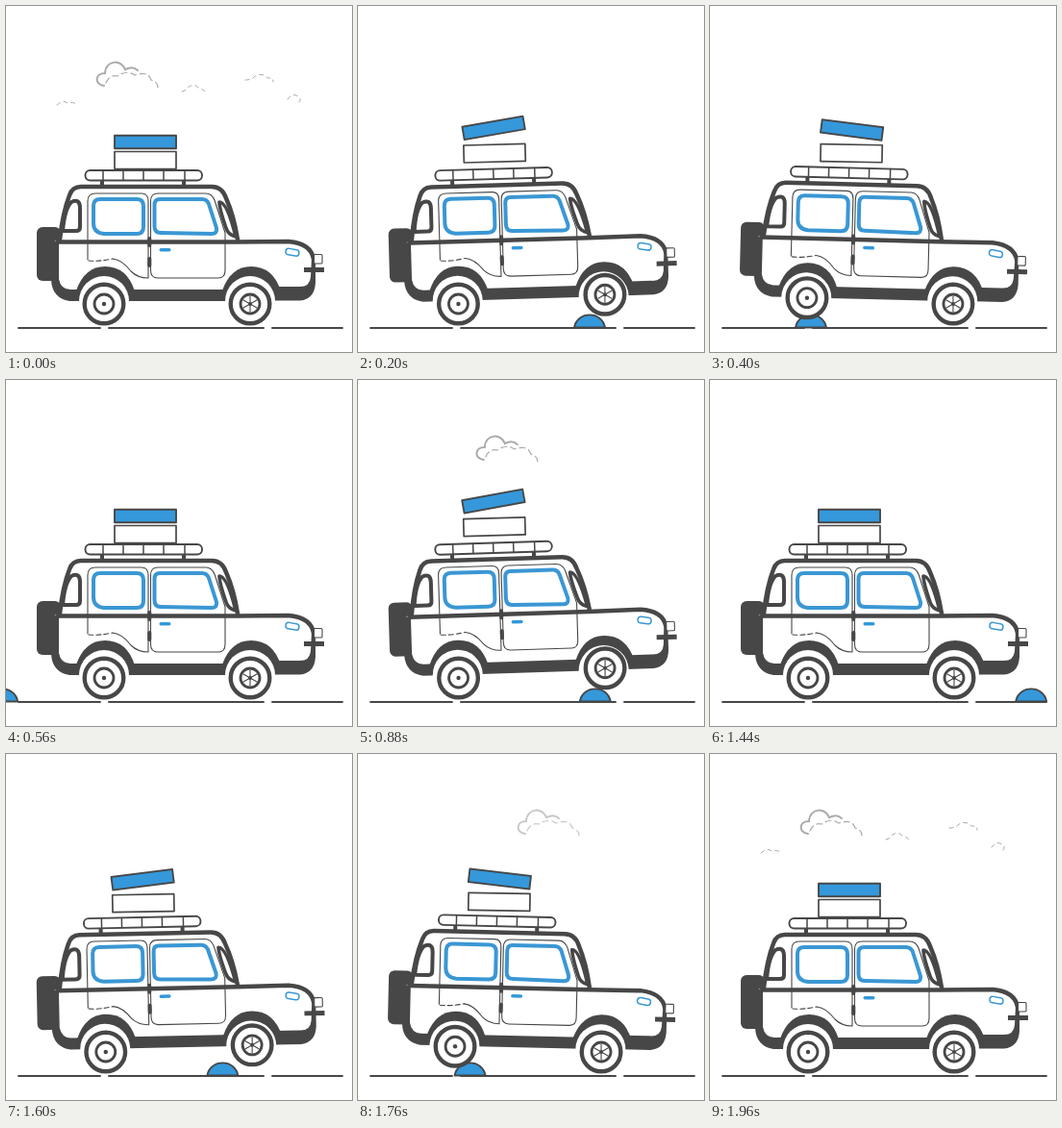
An HTML page that plays this animation: 360x360 px, repeating every 2 s.

```html
<!DOCTYPE html>
<html lang="en">
<head>
<meta charset="utf-8">
<title>Road trip</title>
<style>
  html, body { margin: 0; width: 100%; height: 100%; overflow: hidden; background: #fff; }
  svg { display: block; width: 100vw; height: 100vh; }
  .line { fill: none; stroke: #474747; stroke-linecap: round; stroke-linejoin: round; }
  .thin { stroke-width: 1.1; }
  .mid { stroke-width: 1.9; }
  .bold { stroke-width: 4.5; }
  .dark { fill: #474747; }
  .white { fill: #fff; }
  .blue { fill: #3498db; }
  .glass { fill: #fff; stroke: #3a97d4; stroke-width: 4; stroke-linejoin: round; }
  .cloud { fill: none; stroke: #aaa; stroke-linecap: round; }
</style>
</head>
<body>
<svg viewBox="0 0 360 360">
  <defs>
    <g id="tyre">
      <circle r="20.3" class="line white" stroke-width="4.4"/>
      <circle r="10" class="line" stroke-width="2.8"/>
    </g>
    <!-- wheel arch, relative to the axle -->
    <g id="arch">
      <path class="dark" d="M-29 -14Q-20 -39 1 -39Q24 -39 32 -13V-4H-29Z"/>
      <path class="white" d="M-26 0V-3A26 26 0 0 1 26 -3V0Z"/>
    </g>
  </defs>

  <g id="cloud" class="cloud">
    <path d="M102 83C92 82 92 70 103 70C104 55 121 56 124 66Q132 62 137 67" stroke-width="2"/>
    <path d="M104 80Q108 71 116 73Q126 66 134 72Q148 67 151 77Q158 79 158 85" stroke-width="1.2" stroke-dasharray="6 4"/>
    <g id="puffs" stroke-dasharray="4 4">
      <path d="M53 103Q60 97 64 101Q70 99 74 103"/>
      <path d="M183 89Q188 88 190 84Q197 80 201 86Q207 86 207 91"/>
      <path d="M249 77Q256 77 259 73Q267 69 272 75Q278 74 278 79"/>
      <path d="M293 97Q298 90 304 94Q308 97 305 100"/>
    </g>
  </g>

  <path class="line mid" d="M13 335H98M107 335H268M277 335H350"/>
  <path id="bump" class="line mid" style="fill:#3498db" d="M-16 334.5C-13 317 13 317 16 334.5Z"/>

  <g id="body">
    <rect class="dark" x="32" y="230" width="25" height="56" rx="6"/>
    <path class="white" d="M57 243Q60 210 75 189H214Q230 192 240 243L298 245Q320 249 320 264V290Q318 303 304 304H66Q50 302 50 286V245Z"/>

    <!-- underside -->
    <path class="dark" d="M47 245H55V284Q57 295 67 295H80V307H66Q48 304 47 285Z"/>
    <path class="dark" d="M318 262H322V288Q321 305 306 306.500H276V292H304Q316 293 317 282Z"/>
    <path class="dark" d="M126 295H236V307H126Z"/>
    <use href="#arch" x="102" y="310"/>
    <use href="#arch" x="254" y="310"/>

    <!-- shell -->
    <path class="line bold" d="M56 243Q59 215 66 197Q69 188 78 188H214Q225 188 229 200Q237 218 241 243"/>
    <path class="line bold" d="M54 245.500H240L294 245Q317 247 320 263"/>
    <path class="line white" stroke-width="4" d="M59 234Q61 211 68 204Q77 200 77 210V230Q77 234 73 234Z"/>
    <path class="line white" stroke-width="3.6" d="M222 204Q230 204 239 240Q231 238 229 231Q222 211 222 204Z"/>

    <!-- doors -->
    <path class="line thin" d="M85 264V203Q85 195 93 195H141Q148 195 148 203V283Q137 283 130 276Q121 264 111 263"/>
    <path class="line thin" stroke-dasharray="5 3" d="M86 265Q97 266 111 263"/>
    <path class="line thin" d="M150.500 275V203Q150.500 195 158 195H208Q214 195 217 202L228 236V275Q228 283 221 283H158Q150.500 283 150.500 275"/>
    <path class="line" stroke-width="4" d="M149.300 242V249M149.300 263V270"/>
    <path class="glass" d="M98 201H136Q143 201 143 208V230Q143 237 136 237H102Q91 236 91 226V208Q91 201 98 201Z"/>
    <path class="glass" d="M160 201H204Q209 201 211 206L219 231Q220 237 214 237L161 236Q154.500 236 154.500 229V207Q154.500 201 160 201Z"/>
    <rect class="blue" x="159.500" y="252" width="12" height="3.500" rx="1.700"/>

    <!-- front end -->
    <rect x="291" y="253" width="14" height="6.500" rx="3.200" fill="#fff" stroke="#3a97d4" stroke-width="1.500" transform="rotate(10 298 256)"/>
    <rect class="line thin" style="fill:#fff" x="320.500" y="258.500" width="8.500" height="9.500" rx="1"/>
    <rect class="dark" x="310" y="272" width="21" height="5"/>

    <!-- roof rack -->
    <path class="line" stroke-width="4" style="stroke-linecap:butt" d="M100 181V188M185 181V188"/>
    <rect x="82.500" y="171" width="121.500" height="10.500" rx="5" class="line mid" style="fill:#fff"/>
    <path class="line" stroke-width="1.500" d="M101 171V181M122 171V181M143 171V181M164 171V181M186 171V181"/>
  </g>

  <g id="rear">
    <use href="#tyre"/>
    <circle class="dark" r="2.200"/>
  </g>
  <g id="front">
    <use href="#tyre"/>
    <path class="line thin" d="M0 -8V8M-7 -4L7 4M-7 4L7 -4"/>
    <circle class="dark" r="2"/>
  </g>

  <rect id="lower" class="line" style="fill:#fff" stroke-width="1.700" x="-32" y="-9" width="64" height="18"/>
  <rect id="upper" class="line mid" style="fill:#3498db" x="-32" y="-6.800" width="64" height="13.600"/>
</svg>
<script>
  const LOOP = 2000, STEP = 40;
  const BUMP_START = 377, BUMP_LAP = 688.5, SPEED = 0.68;
  const FRONT = 254, REAR = 102, REACH = 75;
  const CLOUD_LAP = 1000, CLOUD_LEAD = 920, CLOUD_REST = 880, DRIFT = 0.36;

  const el = id => document.getElementById(id);
  const clamp = v => Math.min(1, Math.max(0, v));

  // How far the bump lifts an axle: a soft bell around the moment of contact.
  const lift = gap => 1.05 * Math.cos(clamp(Math.abs(gap) / REACH) * Math.PI / 2) ** 2;

  function place(id, x, y, turn = 0) {
    el(id).setAttribute("transform", `translate(${x} ${y}) rotate(${turn} 0 0)`);
  }

  function drawCar(bumpX) {
    const f = lift(bumpX - FRONT), r = lift(bumpX - REAR);
    el("body").setAttribute("transform",
      `translate(${-0.3 * r} ${-2.6 * f - 1.6 * r}) rotate(${1.4 * r - 1.7 * f} 180 250)`);
    place("rear", REAR + 2.5 * f - r, 310 - 6 * r);
    place("front", FRONT + 3 * f - r, 310 - 10 * f);
    place("lower", 145 - 3 * f + 2 * r, 160.5 - 7.5 * f - 7 * r, r - 1.5 * f);
    place("upper", 145 - 4 * f + 2.5 * r, 141.5 - 15 * f - 12 * r, 7 * r - 10 * f);
  }

  // Clouds fade in while drifting left, rest briefly, then vanish.
  function drawClouds(t) {
    const c = (t + CLOUD_LEAD) % CLOUD_LAP;
    place("cloud", DRIFT * Math.max(0, CLOUD_REST - c), 0);
    el("cloud").setAttribute("opacity", clamp((c - 520) / 250));
    el("puffs").setAttribute("opacity", clamp((c - 800) / 60));
  }

  function render(t) {
    const bumpX = BUMP_START - SPEED * (t % BUMP_LAP);
    place("bump", bumpX, 0);
    drawCar(bumpX);
    drawClouds(t);
  }

  function tick() {
    render(Math.floor((performance.now() % LOOP) / STEP) * STEP);
    requestAnimationFrame(tick);
  }
  tick();
</script>
</body>
</html>
```
